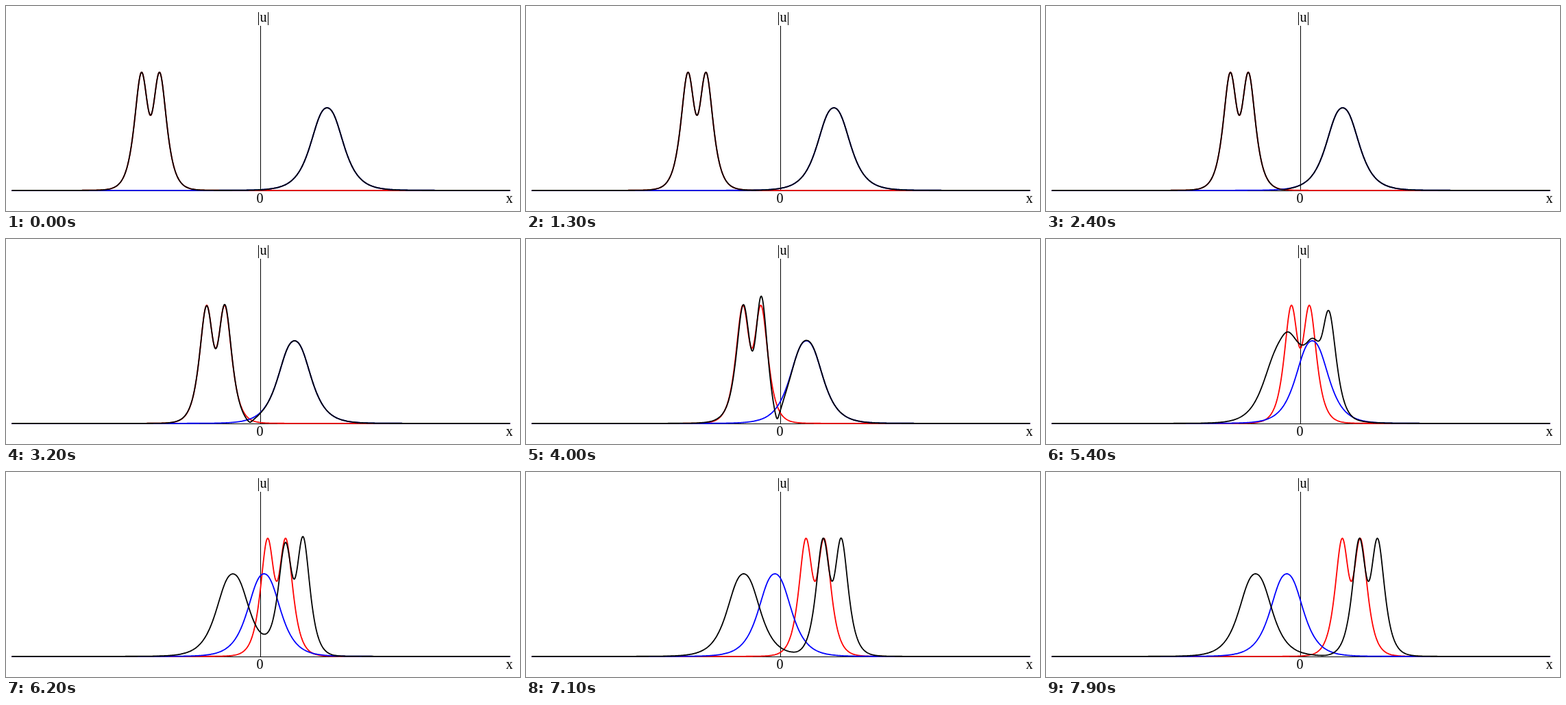
An HTML page with a canvas for the animation above (8000 ms loop, 750 px wide and 300 px high).

```html
<!DOCTYPE html>
<html lang="en">
<head>
<meta charset="utf-8">
<title>Soliton collision</title>
<style>
html, body { margin: 0; width: 750px; height: 300px; overflow: hidden; background: #fff; }
canvas { display: block; }
</style>
</head>
<body>
<canvas id="stage" width="750" height="300"></canvas>
<script>
const ctx = document.getElementById('stage').getContext('2d');
const LEFT = 8, RIGHT = 735, ORIGIN = 371, BASE = 269.8;
const UNIT = 0.0546;      // wave units per pixel
const HEIGHT = 243;       // pixels per unit of |u|
const RATE = 0.16866;     // time scale per step
const STEP = 100, STEPS = 80;

// Each soliton: decay rate, wave number, start centre, and log amplitude
// and phase of its exponential at the origin at time 0.
const solitons = [
  { eta: 1, xi: 0.1143, start: 210.4, log: 14.688, phase: 2.055, color: '#f00' },
  { eta: 0.5526, xi: 0.5117, start: 468, log: -5.061, phase: 0, color: '#00f' }
];

// A soliton travelling alone, in closed form.
function single(s, x, t) {
  const speed = RATE * (s.eta ** 2 - 3 * s.xi ** 2) / UNIT;
  const r = s.xi / Math.hypot(s.eta, s.xi);
  const c = Math.cosh(4 * s.eta * UNIT * (x - s.start - speed * t));
  return s.eta * Math.sqrt(2 * r * (c + r)) / (r * c + 1);
}

// Gaussian elimination for a positive definite system with right side b.
function solve(m, b) {
  const n = b.length;
  for (let i = 0; i < n; i++)
    for (let j = i + 1; j < n; j++) {
      const f = m[j][i] / m[i][i];
      for (let k = i; k < n; k++) m[j][k] -= f * m[i][k];
      b[j] -= f * b[i];
    }
  for (let i = n - 1; i >= 0; i--) {
    for (let k = i + 1; k < n; k++) b[i] -= m[i][k] * b[k];
    b[i] /= m[i][i];
  }
  return b;
}

// Exact two-soliton solution of the Sasa-Satsuma equation: H y + S conj(y) = 1,
// u = sum of e y, split into real and imaginary parts.
function collision(x, t) {
  const X = (x - ORIGIN) * UNIT;
  const waves = solitons.map(({ eta, xi, log, phase }) => ({
    eta, xi,
    size: Math.exp(2 * eta * X - 2 * RATE * t * (eta ** 3 - 3 * eta * xi * xi) + log),
    arg: -2 * xi * X + 2 * RATE * t * (3 * eta * eta * xi - xi ** 3) + phase
  }));
  const m = [[], [], [], []];
  waves.forEach((p, j) => waves.forEach((q, k) => {
    const sum = p.eta + q.eta, dx = q.xi - p.xi, sx = q.xi + p.xi;
    const gr = 1 + p.size * q.size * Math.cos(q.arg - p.arg);
    const gi = p.size * q.size * Math.sin(q.arg - p.arg);
    const d = sum * sum + dx * dx, e = sum * sum + sx * sx;
    const hr = (gr * sum - gi * dx) / d, hi = (gr * dx + gi * sum) / d;
    const sr = sum / e, si = -sx / e;
    m[2 * j][2 * k] = hr + sr;
    m[2 * j][2 * k + 1] = si - hi;
    m[2 * j + 1][2 * k] = hi + si;
    m[2 * j + 1][2 * k + 1] = hr - sr;
  }));
  const y = solve(m, [1, 0, 1, 0]);
  let re = 0, im = 0;
  waves.forEach((w, k) => {
    const c = w.size * Math.cos(w.arg), s = w.size * Math.sin(w.arg);
    re += c * y[2 * k] - s * y[2 * k + 1];
    im += c * y[2 * k + 1] + s * y[2 * k];
  });
  return Math.hypot(re, im);
}

function plot(color, f) {
  ctx.strokeStyle = color;
  ctx.beginPath();
  for (let x = LEFT; x <= RIGHT; x++) ctx.lineTo(x + 0.5, BASE - HEIGHT * f(x));
  ctx.stroke();
}

function draw(t) {
  ctx.fillStyle = '#fff';
  ctx.fillRect(0, 0, 750, 300);
  ctx.fillStyle = '#000';
  ctx.fillRect(ORIGIN, 29, 1, 241);
  ctx.fillRect(LEFT, 270, RIGHT - LEFT, 1);
  ctx.font = '20px "Liberation Serif", serif';
  ctx.textAlign = 'center';
  ctx.fillText('|u|', 375.5, 23);
  ctx.fillText('0', 370.5, 288);
  ctx.fillText('x', 734.5, 288);
  ctx.lineWidth = 1.8;
  ctx.lineJoin = 'round';
  for (const s of solitons) plot(s.color, x => single(s, x, t));
  plot('#000', x => collision(x, t));
}

let shown = -1;
function tick() {
  const t = Math.floor(performance.now() / STEP) % STEPS;
  if (t !== shown) draw(shown = t);
  requestAnimationFrame(tick);
}
tick();
</script>
</body>
</html>
```
